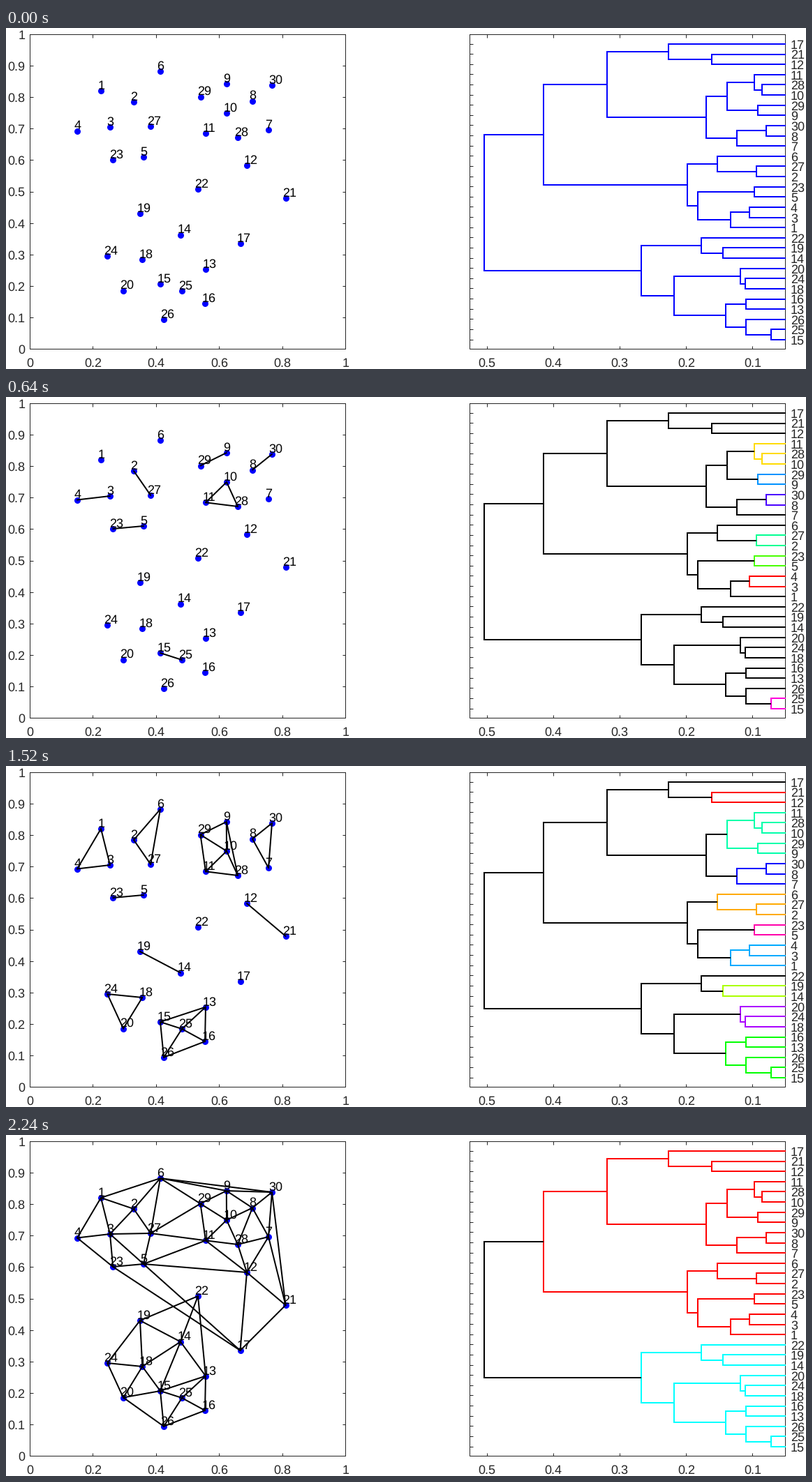
A matplotlib script that plays this animation: 1146 by 489 pixels, repeating every 2320 ms.

```python
import colorsys
from itertools import combinations
from math import floor

import matplotlib.pyplot as plt
import numpy as np
from matplotlib.animation import FuncAnimation
from matplotlib.collections import LineCollection
from matplotlib.tri import Triangulation

W, H, DPI = 1146, 489, 64
PT = 72 / DPI                      # one pixel in points
FONT = 18 * PT
GREY = (0.15, 0.15, 0.15)
TOP, BOTTOM = 9.5, 460.5
SIDE = 452
PLOT_X, TREE_X = 34.5, 664.5       # left edges of the two boxes
FIRST_ROW, LAST_ROW = 23, 447

# The clustered data, in pixels; everything else follows from it.
POINTS = np.array([
    (136, 90), (183, 106), (149, 142), (102, 147.5), (197, 185), (221, 62),
    (376, 146), (353, 104.5), (315.8, 80), (316, 122), (286, 151.3),
    (345, 197), (286, 345.6), (250, 296.5), (221, 367), (285, 395),
    (335.5, 309), (195.3, 332), (192, 266), (168, 376.5), (400.5, 244),
    (275, 231), (153.2, 189), (145.2, 327), (252, 377), (226, 417.8),
    (207.2, 141), (332, 157), (278.5, 98.5), (381, 82),
])
COUNT = len(POINTS)


class Node:
    def __init__(self, leaves, height=0, kids=()):
        self.leaves, self.height, self.kids = leaves, height, kids
        self.path = None


def average_linkage():
    """Merge the two clusters with the smallest mean distance, repeatedly."""
    data = POINTS / (SIDE, BOTTOM - TOP)
    dist = np.linalg.norm(data[:, None] - data[None], axis=2)

    def gap(pair):
        return dist[np.ix_(pair[0].leaves, pair[1].leaves)].mean()

    nodes, merges = [Node([i]) for i in range(COUNT)], []
    while len(nodes) > 1:
        a, b = pair = min(combinations(nodes, 2), key=gap)
        node = Node(a.leaves + b.leaves, gap(pair), pair)
        nodes = [n for n in nodes if n not in pair] + [node]
        merges.append(node)
    return merges


def leaf_order(node, first):
    """From the bottom up: the closest pair leads, then the lowest number."""
    if not node.kids:
        return node.leaves
    kids = sorted(node.kids,
                  key=lambda k: (first not in k.leaves, min(k.leaves)))
    return leaf_order(kids[0], first) + leaf_order(kids[1], first)


def row(i):
    return FIRST_ROW + (LAST_ROW - FIRST_ROW) * i / (COUNT - 1)


def tree_x(height):
    """Heights grow leftwards, with a 5% margin on both sides."""
    low, high = merges[0].height, merges[-1].height
    return TREE_X + SIDE * (0.05 + (high - height) / (high - low)) / 1.1


def lay_out(node):
    """Set the bracket of each merge; return where the node's arm starts."""
    if not node.kids:
        return TREE_X + SIDE + 0.5, row(order.index(node.leaves[0]))
    (ax_, ay), (bx, by) = map(lay_out, node.kids)
    x = tree_x(node.height)
    node.path = [(ax_, ay), (x, ay), (x, by), (bx, by)]
    return x, (ay + by) / 2


def mesh(leaves):
    """Delaunay edges of one cluster."""
    pts = POINTS[leaves]
    if len(pts) == 2:
        return [pts]
    return list(pts[Triangulation(pts[:, 0], -pts[:, 1]).edges])


def line(xs, ys, color, width, z, snap=None):
    return ax.plot(xs, ys, color=color, lw=width * PT, zorder=z, snap=snap,
                   solid_capstyle="butt", solid_joinstyle="miter")[0]


def hair(xs, ys):
    """One-pixel axis line through pixel centres."""
    line([floor(x) + 0.5 for x in xs], [floor(y) + 0.5 for y in ys],
         GREY, 1, 1, snap=False)


def label(x, y, text, ha="left", color="black"):
    """Text with its digits centred on y."""
    ax.text(x, y + 6.3, text, ha=ha, va="baseline", color=color,
            fontsize=FONT, zorder=5)


def box(x0, xticks, yticks, tick=4.5):
    x1 = x0 + SIDE
    hair([x0, x1, x1, x0, x0, x1], [TOP, TOP, BOTTOM, BOTTOM, TOP, TOP])
    for x in xticks:
        hair([x, x], [TOP, TOP + tick])
        hair([x, x], [BOTTOM, BOTTOM - tick])
    for y in yticks:
        hair([x0, x0 + tick], [y, y])
        hair([x1, x1 - tick], [y, y])


def draw_scatter():
    xs = [PLOT_X + SIDE * k / 5 for k in range(6)]
    ys = [BOTTOM - (BOTTOM - TOP) * k / 10 for k in range(11)]
    box(PLOT_X, xs, ys)
    for k, x in enumerate(xs):
        label(x, 480, f"{k / 5:g}", "center", GREY)
    for k, y in enumerate(ys):
        label(27.5, y, f"{k / 10:g}", "right", GREY)
    ax.scatter(*POINTS.T, s=(9 * PT) ** 2, color="blue", lw=0, zorder=2)
    for n, (x, y) in enumerate(POINTS, 1):
        label(x - 4.8, y - 8.5, str(n))


def draw_tree_axes():
    ticks = [k / 10 for k in range(1, 6)]
    box(TREE_X, map(tree_x, ticks), map(row, range(COUNT)))
    for t in ticks:
        label(tree_x(t), 480, f"{t:g}", "center", GREY)
    for i, leaf in enumerate(order):
        label(1124, row(i) + 0.5, str(leaf + 1), color=GREY)


def update(step):
    done = merges[:step]
    for branch in branches:
        branch.set_color("black" if step else "blue")

    # The newest merge of each cluster is its root; later roots come first.
    roots, seen = [], set()
    for node in reversed(done):
        if not seen & set(node.leaves):
            roots.append(node)
            seen |= set(node.leaves)

    for k, root in enumerate(roots):
        color = colorsys.hsv_to_rgb(k / len(roots), 1, 1)
        for node, branch in zip(done, branches):
            if set(node.leaves) <= set(root.leaves):
                branch.set_color(color)
    edges.set_segments([e for root in roots for e in mesh(root.leaves)])
    return [*branches, edges]


plt.rcParams["font.family"] = "Liberation Sans"
plt.rcParams["text.hinting"] = "none"
fig = plt.figure(figsize=(W / DPI, H / DPI), dpi=DPI, facecolor="white")
ax = fig.add_axes([0, 0, 1, 1])
ax.set_xlim(0, W)
ax.set_ylim(H, 0)
ax.axis("off")
ax.set_autoscale_on(False)

merges = average_linkage()
order = leaf_order(merges[-1], merges[0].leaves[0])[::-1]
lay_out(merges[-1])

draw_scatter()
draw_tree_axes()
branches = [line(*zip(*node.path), "blue", 2, 3) for node in merges]
edges = LineCollection([], colors="black", linewidths=2 * PT, zorder=3,
                       capstyle="round")
ax.add_collection(edges, autolim=False)

anim = FuncAnimation(fig, update, frames=len(merges), interval=80,
                     init_func=lambda: update(0), repeat=True)
plt.show()
```
